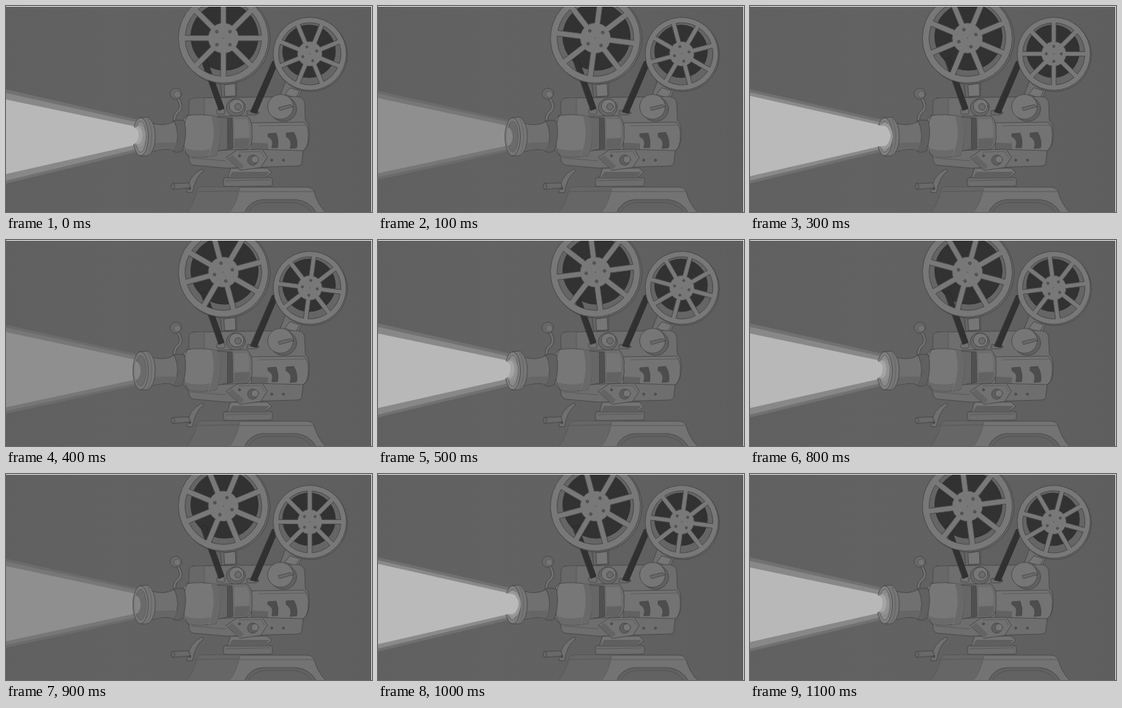
An HTML page with a canvas that plays this animation: 500x282 px, repeating every 1.2 s.

```html
<!DOCTYPE html>
<html lang="en">
<head>
<meta charset="utf-8">
<title>Film projector</title>
<style>
html, body { margin: 0; width: 100%; height: 100%; overflow: hidden; background: #606060; }
canvas { display: block; width: 500px; height: 282px; }
</style>
</head>
<body>
<canvas id="stage" width="500" height="282"></canvas>
<script>
const ctx = document.getElementById('stage').getContext('2d');
const TAU = Math.PI * 2;
const INK = '#444';
const STEP = 100, STEPS = 12;
// one letter per step: m = medium, b = bright, d = dim
const FLICKER = 'mdmbdmbdmdbm';

// each band: top and bottom at the left edge, top and bottom at the lens, colour
const BEAMS = {
  m: [[114, 243, 156, 199, '#717171'], [119, 239, 160, 195, '#888'],
      [128, 230, 166, 189, '#b8b8b8']],
  b: [[114, 243, 156, 199, '#707070'], [118, 239, 160, 195, '#8a8a8a'],
      [123, 233, 164, 191, '#bababa']],
  d: [[116, 238, 157, 198, '#6b6b6b'], [120, 234, 160, 195, '#777'],
      [126, 229, 165, 190, '#8f8f8f']]
};

function paint(fill, line = INK, width = 0.8) {
  if (fill) { ctx.fillStyle = fill; ctx.fill(); }
  if (line) { ctx.strokeStyle = line; ctx.lineWidth = width; ctx.stroke(); }
}
function shape(d, fill, line = INK, width = 0.8) {
  const p = new Path2D(d);
  if (fill) { ctx.fillStyle = fill; ctx.fill(p); }
  if (line) { ctx.strokeStyle = line; ctx.lineWidth = width; ctx.stroke(p); }
}
function oval(x, y, rx, ry, fill, line, width) {
  ctx.beginPath();
  ctx.ellipse(x, y, rx, ry, 0, 0, TAU);
  paint(fill, line, width);
}
function box(x, y, w, h, r, fill, line) {
  ctx.beginPath();
  ctx.roundRect(x, y, w, h, r);
  paint(fill, line);
}

function wall() {
  const g = ctx.createLinearGradient(0, 0, 500, 0);
  g.addColorStop(0, '#606060');
  g.addColorStop(0.3, '#626262');
  g.addColorStop(0.6, '#616161');
  g.addColorStop(1, '#5e5e5e');
  ctx.fillStyle = g;
  ctx.fillRect(0, 0, 500, 282);
}

function beam(mode) {
  for (const [a, b, c, d, color] of BEAMS[mode]) {
    ctx.beginPath();
    ctx.moveTo(0, a);
    ctx.lineTo(182, c);
    ctx.lineTo(182, d);
    ctx.lineTo(0, b);
    ctx.closePath();
    paint(color, null);
  }
}

function reelBack(x, y, r, film) {
  oval(x + 1.2, y + 0.8, r + 0.3, r + 0.3, '#656565');
  oval(x + film.dx, y + film.dy, film.r, film.r, '#323232', '#2b2b2b');
}

function reelFront(x, y, r, turn) {
  const half = Math.PI / 8, web = r * 0.062;
  const inner = r * 0.34, outer = r * 0.85;
  const ai = half - web / inner, ao = half - web / outer;
  ctx.save();
  ctx.translate(x, y);
  ctx.rotate(turn);
  ctx.beginPath();
  ctx.arc(0, 0, r, 0, TAU);
  for (let i = 0; i < 8; i++) {
    const mid = half + i * half * 2;
    ctx.moveTo(inner * Math.cos(mid - ai), inner * Math.sin(mid - ai));
    ctx.arc(0, 0, outer, mid - ao, mid + ao);
    ctx.arc(0, 0, inner, mid + ai, mid - ai, true);
    ctx.closePath();
  }
  ctx.fillStyle = '#787878';
  ctx.fill('evenodd');
  paint(null);
  for (let i = 0; i < 4; i++) {
    const a = Math.PI / 4 + i * Math.PI / 2;
    oval(r * 0.205 * Math.cos(a), r * 0.205 * Math.sin(a), r * 0.031, r * 0.031, '#5b5b5b');
  }
  oval(0, 0, 0.8, 0.8, '#555', null);
  ctx.restore();
}

function stand() {
  // side crank
  shape('M247 255 Q249 232 268 223 L270 226 Q258 234 255 255 Z', '#707070');
  shape('M227 243 L250 242 L252 249 L228 251 Z', '#696969');
  oval(228, 247, 2.5, 4, '#666');
  oval(251, 250, 2, 2, '#4a4a4a', null);
  // base
  shape('M247 283 Q257 270 261 253 Q262 248 270 248 L411 248 Q419 248 421 255 Q426 272 437 283 Z', '#737373');
  shape('M247 283 Q257 270 261 253 Q262 248 270 248 L319 248 Q316 268 304 283 Z', '#666', null);
  shape('M262 254 L318 253 M319 249 Q316 269 305 283 M319 254 L419 254', null, '#555');
  shape('M326 283 Q332 267 350 265 L396 265 Q415 267 424 283 Z', '#626262');
  shape('M331 283 Q337 270 353 269 L394 269 Q410 271 418 283', null, '#505050');
  // neck
  box(297, 235, 67, 12, 3, '#6d6d6d');
  shape('M300 239 L361 238 M330 247 L363 246', null, '#555');
  shape('M307 222 L357 222 L363 228 L354 235 L303 235 Z', '#747474');
  shape('M309 227 L360 227 L354 234 L305 234 Z', '#5f5f5f', null);
}

function arms() {
  shape('M291 84 L315 82 L315 123 L295 125 Z', '#666');
  shape('M298 108 L313 106 L314 123 L299 124 Z', '#767676');
  shape('M384 98 L407 107 L399 128 L374 124 Z', '#6e6e6e');
  shape('M388 112 L401 116 L396 126 L381 121 Z', '#767676');
}

function belts() {
  shape('M266 72 L273 70 L298 140 L291 143 Z', '#313131', '#292929');
  shape('M364 76 L373 74 L342 147 L334 145 Z', '#313131', '#292929');
}

function body() {
  // back plate
  shape('M256 126 L398 124 Q407 125 408 133 L409 157 Q415 160 414 178 Q414 194 406 198 L404 215 Q403 219 397 219 L302 222 L257 218 Q250 217 250 209 L250 133 Q250 127 256 126 Z', '#6e6e6e');
  shape('M256 127 L271 126 L271 150 L251 152 L251 133 Q251 128 256 127 Z', '#686868', null);
  shape('M271 126 L271 149 M253 208 L300 212', null, '#565656');
  for (const [x, y] of [[344, 146], [341, 190], [363, 211], [379, 211]])
    oval(x, y, 1.5, 1.5, '#555');
  // centre wheel and clips
  oval(314, 139, 13, 12, '#666');
  oval(315, 137, 10, 9.5, '#777');
  oval(317, 138, 4.5, 4.5, '#6a6a6a');
  box(288, 141, 11, 7, 2, '#707070');
  box(329, 143, 14, 6, 2, '#696969');
  // dial
  oval(379, 141, 18, 17, '#606060');
  oval(375, 138, 17.5, 17, '#767676');
  shape('M372 139 L389 135 L392 138 L374 143 Z', '#6a6a6a');
  // right barrel
  shape('M335 160 L407 159 Q414 165 413 179 Q413 193 406 198 L336 196 Z', '#737373');
  shape('M336 187 L358 188 L358 196 L336 196 Z', '#626262', null);
  shape('M345 164 L409 163', null, '#595959');
  shape('M358 175 L369 174 Q373 184 371 194 L363 194 Q367 183 358 179 Z', '#4d4d4d');
  shape('M383 174 L393 173 Q399 183 397 194 L388 195 Q392 184 383 179 Z', '#4d4d4d');
  // gate
  shape('M287 151 L329 150 Q338 159 336 174 Q338 190 329 196 L287 198 Z', '#6c6c6c');
  shape('M287 152 L303 153 L303 196 L287 199 Z', '#666');
  shape('M303 153 L309 153 L310 195 L303 196 Z', '#505050');
  shape('M312 155 L329 155 Q334 163 332 180 L312 181 Z', '#757575', null);
  shape('M312 182 L333 181 Q332 191 328 195 L312 195 Z', '#626262', null);
  // lower panel
  shape('M301 207 L316 197 L350 196 L357 207 L348 221 L320 225 Z', '#717171');
  shape('M303 209 L320 224 L325 219 L309 204 Z', '#646464', null);
  shape('M318 200 L348 199 L353 207', null, '#595959');
  oval(337, 211, 7, 7, '#5f5f5f');
  oval(340, 210, 5, 5, '#767676');
  oval(319, 205, 1.5, 1.5, '#555');
}

function lens(mode) {
  // small handle
  ctx.lineCap = 'round';
  const stem = 'M235 127 Q241 136 237 143 Q230 148 230 156';
  shape(stem, null, INK, 4.4);
  shape(stem, null, '#717171', 2.8);
  oval(232, 120, 8, 7.5, '#686868');
  oval(234, 121, 4.5, 4.5, '#747474', '#585858');
  // barrel
  shape('M247 150 Q266 147 287 151 Q298 177 287 205 Q265 209 248 205 Q237 192 237 177 Q238 158 247 150 Z', '#777');
  shape('M280 150 L288 151 Q298 177 287 205 L276 207 Q289 179 280 150 Z', '#696969', null);
  shape('M245 195 Q263 200 279 196 L276 206 Q260 208 249 205 Z', '#6a6a6a', null);
  shape('M248 150 Q241 163 242 179 Q242 196 249 205', null);
  shape('M229 157 Q238 155 244 158 Q248 178 241 198 Q235 202 228 199 Q238 179 229 157 Z', '#606060');
  shape('M198 160 Q216 166 230 158 Q239 178 230 198 Q217 194 198 200 Z', '#707070');
  shape('M202 188 Q220 186 234 187 L230 198 Q216 193 200 199 Z', '#666', null);
  // front ring
  shape('M183 153 L194 152 Q204 160 204 178 Q204 198 194 205 L183 205 Z', '#767676');
  shape('M193 153 Q199 163 199 179 Q199 196 192 205', null, '#606060');
  oval(184, 179, 10.5, 26, mode === 'd' ? '#777' : '#808080');
  oval(184, 179, 7.5, 21, mode === 'd' ? '#6b6b6b' : '#8b8b8b', '#5a5a5a');
  if (mode === 'd') {
    shape('M177 166 Q183 167 184 179 Q183 190 177 192 Q174 179 177 166 Z', '#858585', null);
  } else if (mode === 'm') {
    oval(183, 178, 8, 16, '#929292', '#858585');
    oval(180, 177, 6.5, 12, '#a5a5a5', null);
    shape('M173 165 Q182 168 181 177 Q181 187 173 190 Z', '#b8b8b8', null);
  } else {
    oval(184, 178, 11, 18, '#989898', null);
    oval(182, 178, 9.5, 14, '#bababa', null);
    shape('M172 163 L181 164 Q193 170 192 178 Q192 187 181 191 L172 193 Z', '#bababa', null);
  }
}

function render(step) {
  const mode = FLICKER[step], turn = step * Math.PI / 2 / STEPS;
  wall();
  beam(mode);
  stand();
  arms();
  body();
  reelBack(297.5, 44, 62, { dx: 1, dy: -2, r: 46 });
  reelBack(415, 66, 50, { dx: -1, dy: -4, r: 36 });
  belts();
  reelFront(297, 44, 61.5, turn);
  reelFront(415, 65.5, 50, turn + Math.PI / 8);
  lens(mode);
  ctx.fillStyle = '#e6e6e6';
  ctx.fillRect(0, 0, 500, 1);
  ctx.fillRect(499, 0, 1, 282);
}

let last = -1;
function tick() {
  const step = Math.floor(performance.now() / STEP) % STEPS;
  if (step !== last) render(last = step);
  requestAnimationFrame(tick);
}
tick();
</script>
</body>
</html>
```
